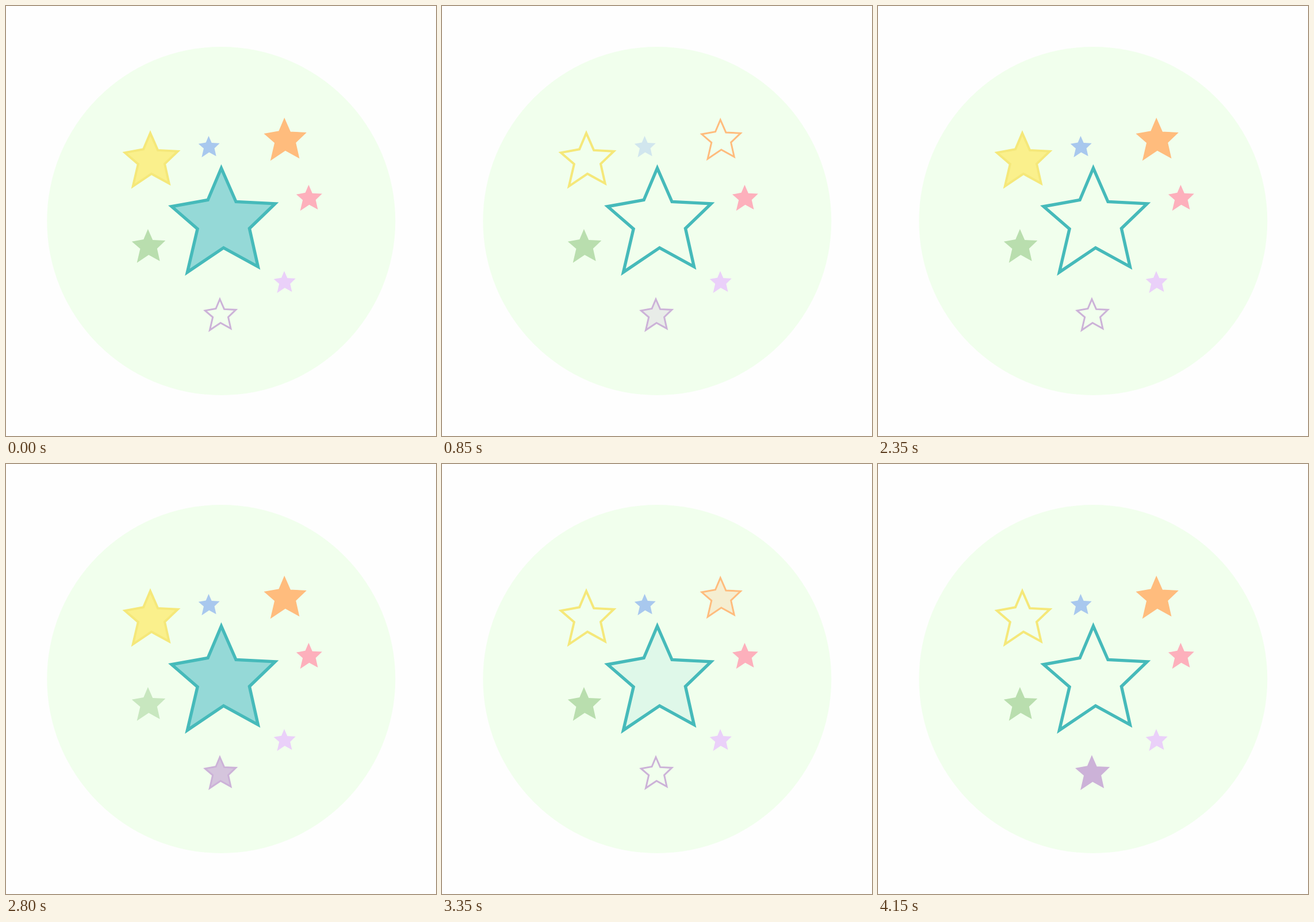
Recreate the animation shown at these times as an HTML page. Size 748 px wide and 748 px high, loop 4350 ms.

```html
<!DOCTYPE html>
<html lang="en">
<head>
<meta charset="utf-8">
<title>Twinkling stars</title>
<style>
html, body { margin: 0; width: 100%; height: 100%; overflow: hidden; background: #fefefe; }
svg { display: block; width: 100vw; height: 100vh; }
</style>
</head>
<body>
<svg viewBox="0 0 748 748"><circle cx="374.3" cy="374" r="303" fill="#f1ffed"/></svg>
<script>
const LOOP = 4350, STEP = 50, FADE = 200, DIP = .55;
const svg = document.querySelector('svg');

// One hand-drawn star, one unit wide, hanging from its top tip.
const SHAPE = '0,0 .142,.325 .52,.344 .272,.583 .355,.953 .022,.77 -.328,1.006 -.23,.587 -.48,.371 -.13,.308';

// Outlined stars fade between empty and filled at each flip time.
const outlined = [
  { x: 374.5, y: 282, size: 180, line: 5.4, color: '#46baba', fill: '#95d9d7', full: 1, flips: [50, 2350, 3190] },
  { x: 251, y: 221, size: 92, line: 4, color: '#f5e87a', fill: '#faf08c', full: 1, flips: [300, 1850, 2900] },
  { x: 484.3, y: 198, size: 67.5, line: 3, color: '#ffbc7d', fill: '#ffbc7d', full: 1, flips: [550, 1900, 3200, 3900] },
  { x: 372, y: 510, size: 53.5, line: 3, color: '#ccb2d8', fill: '#ccb2d8', full: 0, flips: [800, 1850, 2350, 2750, 3600] }
];

// Solid stars may dim briefly around one moment.
const solid = [
  { x: 352.5, y: 226, size: 37, fill: '#a8c8ee', dim: 850 },
  { x: 246.9, y: 388, size: 58.5, fill: '#b9deae', dim: 2900 },
  { x: 526.5, y: 311, size: 45, fill: '#fdb0bc' },
  { x: 484, y: 461, size: 38, fill: '#ead0f9' }
];

const clamp = v => Math.min(1, Math.max(0, v));

function addStar(s, attrs) {
  const el = document.createElementNS('http://www.w3.org/2000/svg', 'polygon');
  const all = { points: SHAPE, transform: `translate(${s.x} ${s.y}) scale(${s.size})`, ...attrs };
  for (const name in all) el.setAttribute(name, all[name]);
  return svg.appendChild(el);
}

function fillLevel(s, t) {
  let level = s.full, change = s.full ? -1 : 1;
  for (const flip of s.flips) {
    level += change * clamp((t - flip) / FADE);
    change = -change;
  }
  return level;
}

function glow(s, t) {
  return s.dim ? 1 - DIP * clamp(1 - Math.abs(t - s.dim) / FADE) : 1;
}

for (const s of outlined) {
  s.el = addStar(s, { fill: s.fill });
  s.level = fillLevel;
  addStar(s, { fill: 'none', stroke: s.color, 'stroke-width': s.line / s.size, 'stroke-miterlimit': 10 });
}
for (const s of solid) {
  s.el = addStar(s, { fill: s.fill });
  s.level = glow;
}

const stars = [...outlined, ...solid];
const start = performance.now();

function draw() {
  const t = Math.floor((performance.now() - start) % LOOP / STEP) * STEP;
  for (const s of stars) s.el.setAttribute('opacity', s.level(s, t));
  requestAnimationFrame(draw);
}
draw();
</script>
</body>
</html>
```
